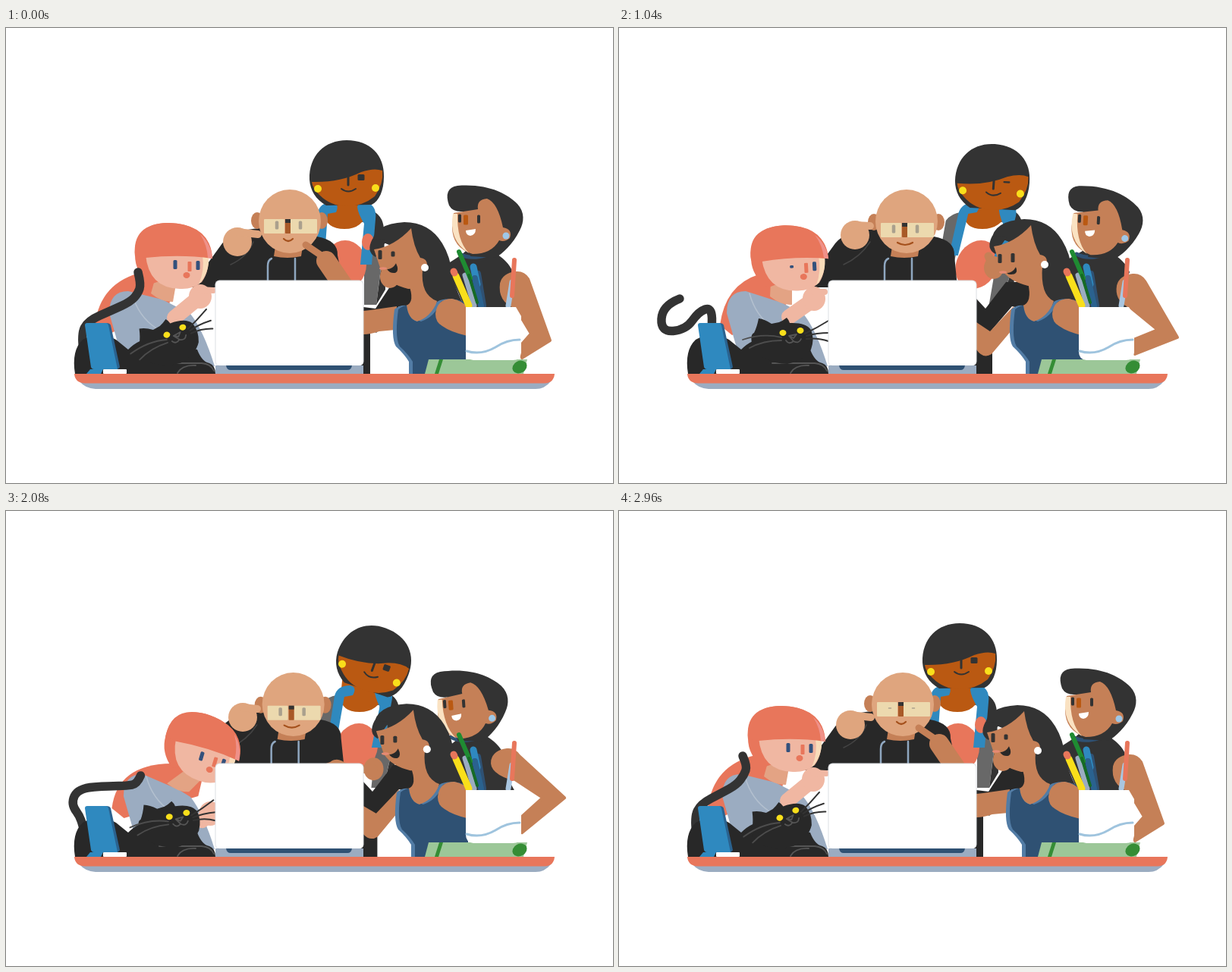
Recreate the animation shown at these times as an HTML page with a canvas. Size 800 px wide and 600 px high, loop 3000 ms.

```html
<!DOCTYPE html>
<html lang="en">
<head>
<meta charset="utf-8">
<style>
html, body { margin: 0; width: 100%; height: 100%; overflow: hidden; background: #fff; }
canvas { display: block; }
</style>
</head>
<body>
<canvas id="stage" width="800" height="600"></canvas>
<script>
const c = document.getElementById('stage').getContext('2d');
c.lineCap = c.lineJoin = 'round';
const INK = '#333', BLACK = '#282828', CORAL = '#e8765b', STEEL = '#9bacc1', NAVY = '#2f5173',
  BLUE = '#2f89bf', YELLOW = '#f9df1b', BROWN = '#ba5912', TAN = '#c58057', PEACH = '#dfa57e',
  PINK = '#f0b7a2', GRAY = '#686868';
const KEYS = [0, 600, 1040, 1520, 1800, 2320, 2960];
let t = 0;

// Monotone cubic through one value per key pose; the last pose defaults to the first.
function k(...v) {
  if (v.length < 7) v.push(v[0]);
  let i = 0;
  while (i < 5 && t >= KEYS[i + 1]) i++;
  const slope = j => (v[j + 1] - v[j]) / (KEYS[j + 1] - KEYS[j]);
  const tangent = j => {
    if (j === 0 || j === 6) return 0;
    const a = slope(j - 1), b = slope(j);
    return a * b > 0 ? 2 * a * b / (a + b) : 0;
  };
  const d = KEYS[i + 1] - KEYS[i], u = Math.min(1, (t - KEYS[i]) / d), w = 1 - u;
  return v[i] * (1 + 2 * u) * w * w + v[i + 1] * u * u * (3 - 2 * u)
    + d * (tangent(i) * u * w * w - tangent(i + 1) * u * u * w);
}
const blink = (...times) => Math.max(.15, Math.min(1, ...times.map(b => Math.abs(t - b) / 120)));

function fill(color, path) { c.fillStyle = color; c.fill(new Path2D(path)); }
function line(color, width, path) {
  c.strokeStyle = color; c.lineWidth = width; c.stroke(new Path2D(path));
}
function dot(color, x, y, rx, ry = rx, turn = 0) {
  c.fillStyle = color; c.beginPath(); c.ellipse(x, y, rx, ry, turn, 0, 7); c.fill();
}
function bar(color, x, y, w, h, r = 0) {
  c.fillStyle = color; c.beginPath(); c.roundRect(x, y, w, h, r); c.fill();
}
const eye = (color, x, y, w, h, open = 1) => bar(color, x - w / 2, y - h * open / 2, w, h * open, 1.5);
function move(dx, dy, angle, cx, cy, draw) {
  c.save();
  c.translate(cx + dx, cy + dy);
  c.rotate(angle * Math.PI / 180);
  c.translate(-cx, -cy);
  draw();
  c.restore();
}

function standingWoman() {
  const lean = k(0, 25, 38, 33, 28, 18);
  bar(BLACK, 455, 380, k(480, 489, 492, 491, 491, 487) - 455, 76);
  c.save();
  c.transform(1, 0, -lean / 221, 1, lean * 456 / 221, 0);
  fill(GRAY, 'M396 340L396 254Q402 244 415 243L480 240Q497 252 496 300L488 365L465 365Z');
  fill(INK, 'M480 240Q497 246 498 265L500 345L488 365L495 310L486 290Z');
  fill('#fff', 'M420 256H472V372H412Z');
  dot(CORAL, 447, 312, 28, 32);
  fill(BROWN, 'M419 222H475V242Q471 265 446 265Q422 265 419 245Z');
  fill(BLUE, 'M411 244Q413 230 430 230Q440 232 435 243L424 245L420 300H408Z');
  fill(BLUE, 'M463 236Q465 227 477 230Q489 236 487 252L482 312H467L472 258Q464 245 463 236Z');
  c.restore();
  const r = k(1, 0, 0, 0, 0, 0);
  dot(CORAL, 477, 282, 8 * r, 11 * r);
  move(k(0, 29.5, 43.5, 45, 44, 28), k(0, 2.5, 5, 5, 5, 2.5), k(0, 1.5, 4, 17, 23, 15), 449, 190, () => {
    fill(INK, 'M400 200C399 168 420 148 449 148C480 148 499 168 498 196C498 214 492 228 482 233L422 234C408 226 401 214 400 200Z');
    fill(BROWN, 'M403 203Q440 204 468 190Q485 184 496 188Q498 205 486 222Q470 235 449 235Q428 235 413 220Q404 212 403 203Z');
    eye(INK, 468, 197, 9, 8, k(1, .3, .3, 1, 1, 1));
    line(INK, 3, 'M451 196V207');
    line(INK, 2, 'M442 212Q451 219 461 212');
    dot(YELLOW, 411, 212, 5);
    dot(YELLOW, 487, 211, 5);
  });
}

function rightMan() {
  const s = k(0, 3, 5, -8, -11, -12);
  fill(INK, `M${606 + s} 294Q600 300 580 312L606 372H672L660 350L${668 + s} 322Q${662 + s} 306 ${640 + s} 294Z`);
  line(NAVY, 5, `M${598 + s} 298Q${612 + s} 306 ${634 + s} 299`);
  const ex = k(717, 719, 736, 740, 738, 734), ey = k(412, 414, 408, 384, 377, 381);
  const ix = k(692, 695, 710, 711, 708, 707), iy = k(403, 405, 398, 383, 377, 380);
  const low = k(435, 436, 430, 427, 428, 421), high = k(419, 416, 411, 405, 404, 406);
  const pit = k(368, 368, 366, 357, 354, 354), top = k(323, 324, 326, 316, 315, 315);
  const arm = `M${672 + s} ${top}Q${682 + s} ${top - 1} ${688 + s} ${top + 8}L${ex} ${ey}L680 ${low}L678 ${high}L${ix} ${iy}L671 ${pit}Q${650 + s} ${pit - 9} ${653 + s} ${top + 14}Q${656 + s} ${top + 2} ${672 + s} ${top}Z`;
  fill(TAN, arm);
  line(TAN, 4, arm);
  move(k(0, 8, 9, -14, -20, -20), k(0, 1, 2, 3, 2, 1), k(0, 2, 3, -5, -4, -4), 630, 250, () => {
    fill(INK, 'M584 234Q576 211 595 208C635 205 660 218 674 232C684 243 683 256 677 267C668 285 655 297 645 303L612 301L602 242Q589 243 584 234Z');
    fill(TAN, 'M590 244L622 239Q620 226 634 225Q648 230 655 263Q668 265 664 277Q657 283 650 280Q640 298 615 298Q588 290 588 262Z');
    fill('#fae2c2', 'M589 245Q583 280 610 297Q594 280 595 245Z');
    eye(INK, 598, 251, 4, 11);
    eye(BROWN, 606, 253, 6, 13);
    eye(INK, 623, 252, 4, 11);
    fill('#fff', 'M606 267L619 265Q619 273 612 274Q606 273 606 267Z');
    dot('#9fc8e8', 659, 274, 4.5);
  });
}

function baldMan() {
  const dx = k(0, 2, 5, 5, 5, 4), dy = k(0, 3, 5, 5, 5, 4);
  fill(BLACK, `M243 342L285 284Q300 266 335 264L${410 + dx} 275Q${438 + dx} 280 ${437 + dx} 300L446 342Z`);
  line('#444', 1.5, `M${326 + dx} 282Q318 302 296 312`);
  line('#8fa7c0', 2.5, `M${345 + dx} 333V314Q${345 + dx} 306 ${350 + dx} 304M${381 + dx} 304V333`);
  fill(TAN, `M${355 + dx} 288h36l-2 13q-18 4-36 0z`);
  dot(TAN, 331 + dx, 254 + dy * .4, 8, 11);
  dot(TAN, 416 + dx, 254 + dy * .4, 8, 11);
  dot(PEACH, 374 + dx, 255, 41, 42);
  move(dx, dy, 0, 0, 0, () => {
    bar('#ecd9ae', 340, 252, 27, 19, 1);
    bar('#ecd9ae', 375, 252, 35, 19, 1);
    bar('#a85a28', 368, 253, 7, 18, 1);
    bar(INK, 368, 252, 7, 5);
    const open = blink(600, 2960);
    eye('#aaa08d', 357, 260, 4.5, 11, open);
    eye('#aaa08d', 388, 260, 4.5, 11, open);
    const wide = k(6, 9, 10, 10, 10, 10);
    line('#a4501c', 2.2, `M${372 - wide} 278Q372 284 ${372 + wide} 278`);
  });
  const hx = k(305, 311, 311, 311, 312, 312), hy = k(282, 281, 273, 273, 272, 272);
  dot(PEACH, hx, hy, 19);
  line(PEACH, 10, `M${hx} ${hy - 13}L${k(332, 318, 331, 331, 331, 331)} ${k(272, 274, 261, 261, 261, 261)}`);
  const px = k(422, 430, 440, 432, 431, 440), py = k(307, 333, 346, 334, 334, 346);
  line(TAN, 26, `M450 348L${px} ${py}`);
  line(TAN, 9, `M${px - 5} ${py - 6}L${k(395, 405, 438, 414, 413, 434)} ${k(286, 327, 340, 332, 332, 340)}`);
}

function blueWoman() {
  const b = k(0, 1, 5, 5, 5, 1), up = k(0, 1, 1, 1, 1, 1);
  fill(BLACK, `M471 ${368 - 11 * up}L${487 - 4 * up} 370L510 335L545 335L550 375L518 367L488 402L471 388Z`);
  const hx = k(506, 500, 494, 481, 482, 488), hy = k(328, 325, 316, 334, 334, 345);
  dot(TAN, hx, hy, 13, 15);
  line(TAN, 11, `M${hx} ${hy}L${k(506, 496, 487, 453, 454, 480)} ${k(328, 322, 301, 326, 326, 352)}`);
  const arm = `M471 ${k(373, 396, 388, 388, 388, 390)}L${k(480, 485, 489, 489, 489, 486)} ${k(372, 386, 400, 400, 400, 396)}L${515 + b} 367L${513 + b} 398L${k(492, 487, 491, 491, 491, 489)} ${k(400, 422, 430, 430, 430, 428)}Q480 ${k(404, 428, 437, 437, 437, 434)} 471 ${k(404, 427, 424, 424, 424, 428)}Z`;
  fill(TAN, arm);
  const dx = k(0, 1, 9, 9, 9, -2), dy = k(0, -2, -4, -4, -4, 0);
  move(dx, dy, 0, 0, 0, () => {
    fill(INK, 'M482 284Q485 258 525 256Q558 256 575 284Q586 302 588 325Q594 350 608 374L550 374Q535 350 540 300L500 284Z');
    fill(INK, 'M483 278Q474 295 487 302L502 280Z');
  });
  fill(TAN, `M${528 + dx} ${325 + dy}L${549 + dx} ${318 + dy}Q${546 + dx} 352 ${568 + b} 360Q566 384 ${546 + b} 388Q528 385 ${527 + b} 366Q${540 + b} 362 ${530 + dx} 336Z`);
  move(dx, dy, 0, 0, 0, () => {
    fill(TAN, 'M485 292Q512 288 534 264Q537 288 546 303Q556 304 555 315Q553 321 547 320Q544 345 530 344Q505 338 495 322Z');
    c.save();
    c.translate(0, k(0, 5, 9, 8, 7, 3));
    const open = blink(2320);
    eye(INK, 493, 299, 5, 12, open);
    eye(INK, 510, 298, 5, 12, Math.min(open, k(.6, .8, 1, 1, 1, .5)));
    dot('#e58a73', 497, 317, 5, 1.8);
    c.translate(509, 316);
    c.rotate(-.45);
    const gape = k(6, 5, 2.5, 3, 5.5, 6);
    fill(BLACK, `M-7 -1Q0 2 7 -3Q7 ${gape + 2} 1 ${gape + 2}Q-6 ${gape} -7 -1Z`);
    c.restore();
    dot('#fff', 552, 316, 5);
  });
  move(b, 0, 0, 0, 0, () => {
    const dress = 'M512 371Q519 365 528 366Q530 384 542 387Q560 381 568 361Q582 353 606 362V456H531V440Q525 430 514 420Q507 409 512 371Z';
    fill('#527ca5', dress);
    c.save();
    c.clip(new Path2D(dress));
    c.translate(5, 0);
    fill(NAVY, dress);
    bar(NAVY, 575, 355, 35, 101);
    c.restore();
    fill(TAN, 'M566 377Q568 357 588 357Q602 360 608 368V406Q586 401 575 393Q566 388 566 377Z');
  });
}

function redhead() {
  const dx = k(0, -5, 4, 36, 37, 39), dy = k(0, 1, 3, 11, 11, 11);
  const px = k(117, 122, 133, 149, 145, 134), lx = k(136, 135, 142, 163, 157, 153);
  const nx = k(206, 206, 214, 229, 229, 224), ny = k(358, 360, 362, 368, 368, 366);
  fill(CORAL, `M${180 + dx} ${322 + dy}Q${px + 7} ${k(335, 336, 339, 342, 340, 330)} ${px} 392L${px + 16} 405L${215 + dx} ${365 + dy}L${222 + dx} ${335 + dy}Z`);
  fill(STEEL, `M${lx + 16} 432L${lx} 376Q${lx} 347 ${lx + 25} 347L${nx} ${ny}L243 377Q260 398 275 446H180Z`);
  line('#b3c0cf', 1.5, `M${lx + 30} 350Q${lx + 38} 380 ${lx + 62} 396`);
  fill('#e3a384', `M${196 + dx} ${332 + dy}L${224 + dx} ${338 + dy}L${nx + 14} ${ny + 3}Q${nx} ${ny + 4} ${nx - 15} ${ny - 8}Z`);
  const hx = k(256, 250, 257, 270, 270, 268), hy = k(354, 355, 357, 410, 402, 396);
  line(PINK, 20, `M${k(222, 217, 224, 262, 260, 256)} ${k(382, 384, 381, 416, 412, 404)}L${hx - 6} ${hy + 5}`);
  dot(PINK, hx, hy, 15, 16);
  line(PINK, 8, `M${hx} ${hy - 9}L${k(273, 273, 271, 276, 276, 276)} ${k(346, 348, 348, 405, 398, 392)}`);
  move(dx, dy, k(0, -4, -3, 6, 9, 21), 220, 300, () => {
    fill(CORAL, 'M170 300Q166 258 213 257Q262 258 270 292L245 320L190 338Q170 322 170 300Z');
    fill(PINK, 'M184 299Q200 294 220 293L266 298Q269 320 258 335Q246 345 229 344Q188 343 184 299Z');
    fill('#f9dcba', 'M259 300H267Q269 322 254 338Q262 320 259 300Z');
    fill(CORAL, 'M170 301C168 274 184 257 213 257C248 257 272 275 272 304Q230 298 184 303Z');
    fill('#ef9189', 'M256 272Q270 284 272 304L266 303Q265 286 256 272Z');
    const open = Math.max(.3, blink(1040));
    eye('#34517c', 223, 312, 5, 12, open);
    eye('#34517c', 253, 313, 5, 12);
    bar(CORAL, 239.5, 308, 5, 13, 1);
    dot(CORAL, 238, 326, 4.5, 4);
  });
}

const TAIL = [
  [102, 425, 99, 404, 108, 386, 140, 372, 164, 361, 174, 350, 178, 338, 174, 322],
  [104, 425, 97, 404, 95, 380, 108, 364, 145, 369, 170, 370, 181, 360, 179, 345],
  [118, 425, 123, 398, 122, 368, 105, 374, 88, 398, 55, 401, 57, 366, 80, 357],
  [102, 425, 100, 404, 108, 388, 140, 373, 166, 362, 178, 349, 179, 337, 173, 322],
  [102, 425, 98, 404, 98, 382, 120, 370, 158, 362, 172, 355, 176, 345, 176, 333],
  [104, 425, 102, 408, 79, 390, 83, 363, 125, 363, 152, 366, 171, 368, 178, 357],
  [102, 425, 99, 404, 108, 386, 135, 372, 155, 361, 165, 348, 169, 336, 163, 323]
];
function cat() {
  const p = TAIL[0].map((_, i) => k(...TAIL.map(pose => pose[i])));
  let tail = `M${p[0]} ${p[1]}`;
  for (let i = 2; i < 12; i += 2)
    tail += `Q${p[i]} ${p[i + 1]} ${(p[i] + p[i + 2]) / 2} ${(p[i + 1] + p[i + 3]) / 2}`;
  line(INK, 11.5, `${tail}Q${p[12]} ${p[13]} ${p[14]} ${p[15]}`);
  fill(BLACK, 'M91 456Q86 425 101 411Q123 398 145 411L161 424Q185 400 215 415L252 424Q258 440 268 442Q276 445 276 456Z');
  line('#555', 1.8, 'M202 442H258Q270 443 274 452M226 455Q232 444 250 445');
  const a = k(-18, 0, 0, -16, -15, 1);
  move(k(-5, 0, 0, -5, -4, 1), k(-1, 0, 0, -1, 0, 0), a, 228, 401, () => {
    fill(BLACK, 'M184 383Q192 384 201 390L211 388Q216 386 221 382Q224 385 225 389Q246 388 253 398Q258 410 253 424Q245 438 222 443Q190 442 176 420Q172 404 178 402Q182 394 184 383Z');
    line('#4d4d4d', 1.8, 'M214 408Q190 402 163 411M214 412Q190 412 172 422');
    line(INK, 2, 'M245 403Q260 396 276 386M247 406Q260 402 277 402M247 410Q262 408 276 413');
    dot(YELLOW, 216, 402, 4.5, 4);
    dot(YELLOW, 239, 399, 4.5, 4);
    line('#555', 1.8, 'M224 406L234 404L230 409ZL230 413M230 413Q224 418 220 412M230 413Q237 417 240 410');
  });
}

function desk() {
  // phone on its stand
  fill('#2a628f', 'M132 389Q137 389 138 392L150 447Q149 450 145 450H130Z');
  fill(BLUE, 'M107 389H132Q134 389 135 392L147 450H116Q113 450 112 447L104 392Q104 389 107 389ZM111 450H128L125 456H106Z');
  bar('#fff', 128, 450, 31, 6, 1);
  // laptop
  bar('#dcdfe3', 275.5, 332.5, 196, 113, 6);
  bar('#fff', 276.5, 333.5, 194, 111.5, 5);
  bar(STEEL, 276, 445, 195, 12);
  fill(NAVY, 'M290 445H456Q455 451 450 451H296Q291 451 290 445Z');
  // book
  fill('#9cc798', 'M557 437H687L682 456H552Z');
  fill('#358d35', 'M571 437H576L570 456H565Z');
  dot('#358d35', 677, 447, 10, 8, -.5);
  // pens and cup
  line(NAVY, 8, 'M622 324L629 366');
  line(BLUE, 9, 'M616 315L621 338');
  line('#2a628f', 8, 'M618 330L626 366');
  line(STEEL, 7, 'M605 326L617 366');
  line('#1f8b32', 6, 'M597 295L612 330');
  line('#166b26', 4, 'M610 326L621 362');
  line(YELLOW, 9, 'M593 327L610 366');
  line(CORAL, 9, 'M590 321L591 323');
  line('#a9c6e0', 7, 'M667 335L662 366');
  line(CORAL, 6, 'M670 306L667 353');
  fill('#fff', 'M606 368H672L679 380V428Q678 438 668 438H616Q606 437 606 427Z');
  line('#9fc4de', 3, 'M607 426Q626 432 645 421Q660 411 677 411');
  // table top
  fill(STEEL, 'M97 466H718Q710 476 698 476H118Q104 475 97 466Z');
  fill(CORAL, 'M90 456H723Q722 468 710 468.500H104Q91 468 90 456Z');
}

function frame(now) {
  t = Math.floor(now % 3000 / 40) * 40;
  c.fillStyle = '#fff';
  c.fillRect(0, 0, 800, 600);
  standingWoman();
  rightMan();
  baldMan();
  blueWoman();
  redhead();
  cat();
  desk();
  requestAnimationFrame(frame);
}
frame(0);
</script>
</body>
</html>
```
